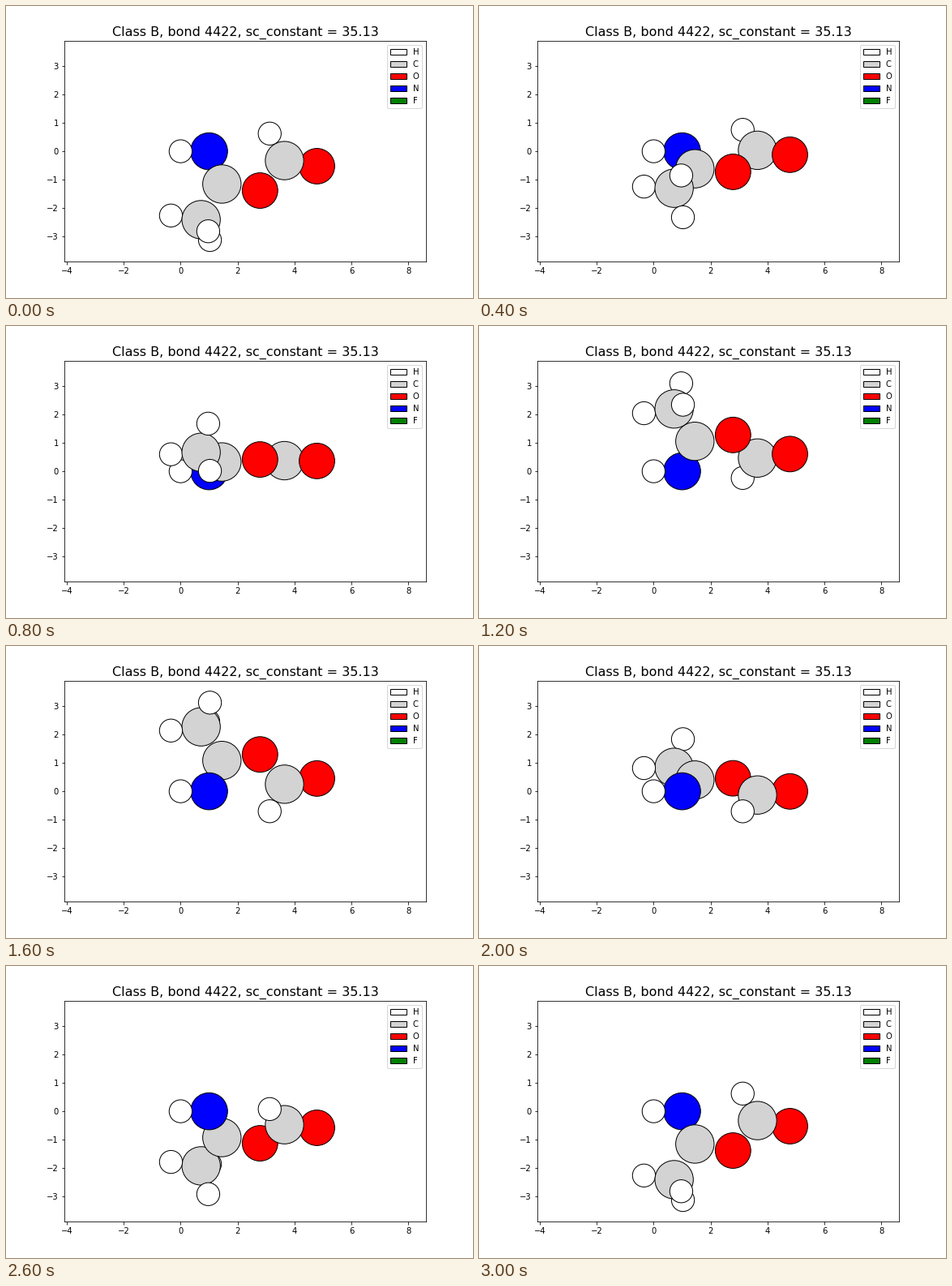
These frames come from a looping animation (576x360 px, 3.2 s). A matplotlib script:

```python
import numpy as np
import matplotlib.pyplot as plt
from matplotlib.animation import FuncAnimation
from matplotlib.patches import Patch

FRAMES, INTERVAL = 16, 200
COLORS = {"H": "white", "C": "lightgray", "O": "red", "N": "blue", "F": "green"}
RADII = {"H": 25, "C": 70, "O": 60, "N": 65}  # atomic radii in pm
AREA_PER_PM = 32

# element, x, y, z with the N-H bond lying on the x axis
ATOMS = [
    ("C", 0.72, -2.403, 0.417),
    ("C", 1.45, -1.15, 0.208),
    ("N", 1.0, 0.0, 0.0),
    ("O", 2.79, -1.38, 0.271),
    ("C", 3.65, -0.327, 0.341),
    ("O", 4.79, -0.524, 0.309),
    ("H", -0.34, -2.257, 0.363),
    ("H", 0.97, -2.81, 1.387),
    ("H", 1.03, -3.117, -0.313),
    ("H", 0.0, 0.0, 0.0),
    ("H", 3.13, 0.621, 0.455),
]

elements = [a[0] for a in ATOMS]
x, y, z = np.array([a[1:] for a in ATOMS]).T
sizes = np.array([RADII[e] * AREA_PER_PM for e in elements])
fills = np.array([COLORS[e] for e in elements])

fig, ax = plt.subplots(figsize=(8, 5), dpi=72)
fig.subplots_adjust(left=0.125, right=0.9, bottom=0.125, top=0.88)
ax.set_xlim(-4.085, 8.633)
ax.set_ylim(-3.872, 3.872)
ax.set_title("Class B, bond 4422, sc_constant = 35.13", fontsize=16)
ax.legend(
    handles=[Patch(facecolor=c, edgecolor="black", label=e) for e, c in COLORS.items()],
    loc="upper right",
)
balls = ax.scatter(x, y, s=sizes, c=fills, edgecolors="black", linewidths=1)


def update(i):
    """Turn the molecule about the x axis and paint it back to front."""
    angle = 2 * np.pi * i / (FRAMES - 1)
    c, s = np.cos(angle), np.sin(angle)
    height = y * c + z * s
    depth = z * c - y * s
    order = np.argsort(depth, kind="stable")
    balls.set_offsets(np.column_stack([x, height])[order])
    balls.set_sizes(sizes[order])
    balls.set_facecolor(fills[order])
    return (balls,)


anim = FuncAnimation(fig, update, frames=FRAMES, interval=INTERVAL, repeat=True, repeat_delay=0)
plt.show()
```
